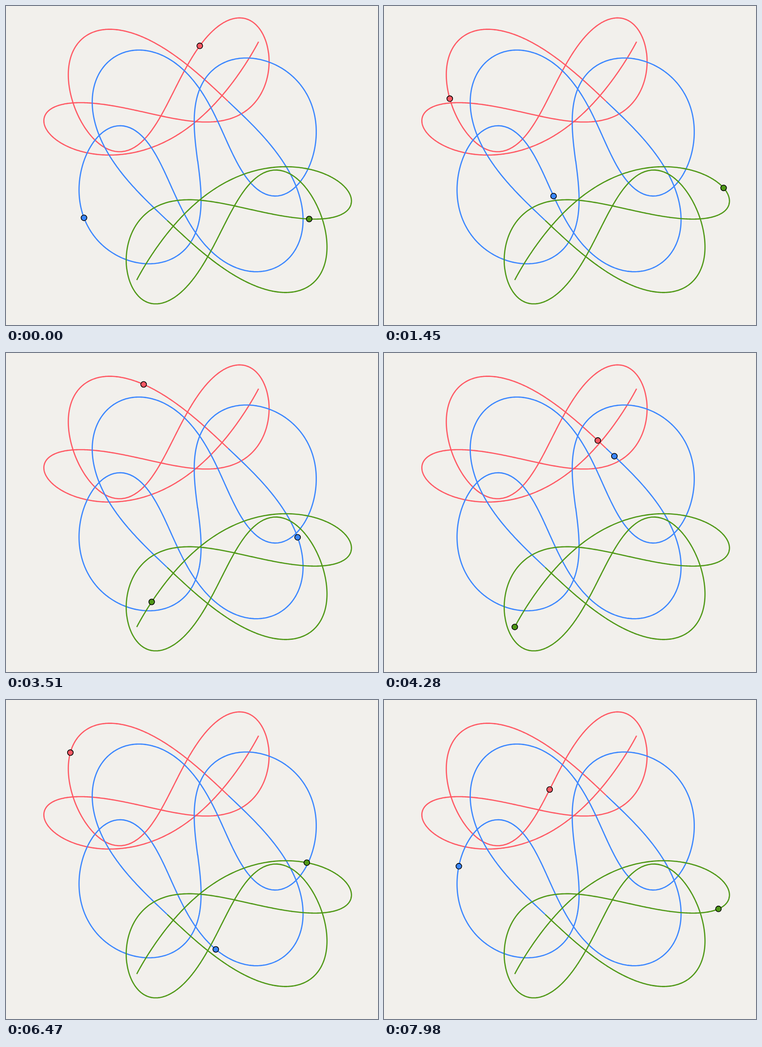
Recreate the animation shown at these times as an HTML page. Size 809x693 px, loop 8000 ms.

```html
<!DOCTYPE html>
<html lang="en">
<head>
<meta charset="utf-8">
<title>Three-body orbit</title>
<style>
  html, body { margin: 0; width: 100%; height: 100%; overflow: hidden; background: #f2f0ec; }
  svg { display: block; width: 809px; height: 693px; }
  path { fill: none; stroke-width: 2.6; stroke-linejoin: round; }
  circle { stroke: #000; stroke-width: 1.6; }
</style>
</head>
<body>
<svg id="stage" viewBox="0 0 809 693"></svg>
<script>
const LOOP = 8000;
const COLORS = ['#ff5964', '#3a86ff', '#4f9816'];
const PAIRS = [[0, 1], [0, 2], [1, 2]];

// Time in seconds, then x, y of the red, blue and green body.
const WAYPOINTS = [
  [0, 422.6, 84.3, 170.5, 462.5, 657, 462.5],
  [1.45, 142.7, 200.7, 369, 413.5, 738.7, 395],
  [2.75, 190, 57, 607.2, 555, 453.2, 397.8],
  [4.28, 463.8, 189, 502, 225.4, 284.5, 595],
  [5.19, 269.8, 57.5, 644, 439.8, 336.7, 512],
  [6.47, 139.8, 114.3, 456, 541.8, 654.7, 353.2],
  [7.98, 358.9, 196.7, 163, 359.2, 728.4, 453.7]
];

// Centre x, y; green's resting point x, y; collision angle; pair energy / 1e3;
// gravity / 1e6; time of the collision; time from there to the symmetric middle.
const GUESS = [416.8, 336.4, 284.5, 595, 0.757, 0, 21.3, 4.253, 5.9];
const COLLISION = 7, MIDDLE = 8;

function derivative(y, k) {
  const d = [...y.slice(6), 0, 0, 0, 0, 0, 0];
  for (const [i, j] of PAIRS) {
    const dx = y[2 * j] - y[2 * i], dy = y[2 * j + 1] - y[2 * i + 1];
    const q = k / Math.hypot(dx, dy) ** 3;
    d[6 + 2 * i] += q * dx; d[7 + 2 * i] += q * dy;
    d[6 + 2 * j] -= q * dx; d[7 + 2 * j] -= q * dy;
  }
  return d;
}

function stepRK4(y, k, dt) {
  const shifted = (d, h) => y.map((v, i) => v + d[i] * h);
  const a = derivative(y, k);
  const b = derivative(shifted(a, dt / 2), k);
  const c = derivative(shifted(b, dt / 2), k);
  const d = derivative(shifted(c, dt), k);
  return y.map((v, i) => v + dt / 6 * (a[i] + 2 * b[i] + 2 * c[i] + d[i]));
}

// Red and blue burst out of their collision while green starts from rest.
function integrate(p, end = 6.8) {
  const [cx, cy, gx, gy, angle] = p, energy = p[5] * 1e3, k = p[6] * 1e6;
  const mx = cx + (cx - gx) / 2, my = cy + (cy - gy) / 2;
  const r0 = 12, t0 = 2 / 3 * r0 ** 1.5 / Math.sqrt(4 * k);
  const ex = Math.cos(angle), ey = Math.sin(angle);
  const speed = Math.sqrt(2 * (energy + 2 * k / r0)) / 2;
  const pull = 2 * k / Math.hypot(mx - gx, my - gy) ** 3 * t0;
  const vx = pull * (mx - gx), vy = pull * (my - gy);
  let t = t0;
  let y = [mx - ex * r0 / 2, my - ey * r0 / 2, mx + ex * r0 / 2, my + ey * r0 / 2, gx, gy,
    -ex * speed - vx / 2, -ey * speed - vy / 2, ex * speed - vx / 2, ey * speed - vy / 2, vx, vy];
  const track = [{ t: 0, y: [mx, my, mx, my, gx, gy, 0, 0, 0, 0, 0, 0] }, { t, y }];
  while (t < end && track.length < 3000) {
    const near = Math.min(...PAIRS.map(([i, j]) =>
      Math.hypot(y[2 * j] - y[2 * i], y[2 * j + 1] - y[2 * i + 1])));
    const dt = 0.025 * Math.sqrt(near ** 3 / (2 * k));
    y = stepRK4(y, k, dt);
    t += dt;
    track.push({ t, y });
  }
  return track;
}

// Positions and velocities at time t, by Hermite interpolation.
function stateAt(track, t) {
  let lo = 0, hi = track.length - 1;
  while (hi - lo > 1) {
    const mid = (lo + hi) >> 1;
    if (track[mid].t > t) hi = mid; else lo = mid;
  }
  const a = track[lo], b = track[hi], h = b.t - a.t;
  const u = Math.min(1, (t - a.t) / h), w = 1 - u;
  return a.y.map((v, i) => lo === 0 || i > 5
    ? v * w + b.y[i] * u
    : w * w * (1 + 2 * u) * v + u * u * (3 - 2 * u) * b.y[i]
      + h * u * w * (w * a.y[i + 6] - u * b.y[i + 6]));
}

function waypointErrors(p, track = integrate(p)) {
  return WAYPOINTS.flatMap(([t, ...xy]) => {
    const y = stateAt(track, Math.abs(t - p[COLLISION]));
    return xy.map((v, i) => y[i] - v);
  });
}

// In the middle blue crosses the centre while red and green move in parallel.
function orbitErrors(p) {
  const track = integrate(p), y = stateAt(track, p[MIDDLE]);
  return [...waypointErrors(p, track),
    3 * (y[2] - p[0]), 3 * (y[3] - p[1]), y[6] - y[10], y[7] - y[11]];
}

function solve(A, b) {
  const n = b.length, M = A.map((row, i) => [...row, b[i]]);
  for (let c = 0; c < n; c++) {
    let best = c;
    for (let r = c + 1; r < n; r++) if (Math.abs(M[r][c]) > Math.abs(M[best][c])) best = r;
    [M[c], M[best]] = [M[best], M[c]];
    for (let r = 0; r < n; r++) {
      if (r === c) continue;
      const f = M[r][c] / M[c][c];
      for (let j = c; j <= n; j++) M[r][j] -= f * M[c][j];
    }
  }
  return M.map((row, i) => row[n] / row[i]);
}

const dot = (a, b) => a.reduce((sum, v, i) => sum + v * b[i], 0);

// Levenberg-Marquardt least squares.
function fit(p, errors, rounds = 30) {
  let damping = 0.01, e = errors(p), cost = dot(e, e);
  for (let n = 0; n < rounds; n++) {
    const J = p.map((v, i) => {
      const h = 1e-4 * Math.max(1, Math.abs(v)), q = [...p];
      q[i] += h;
      return errors(q).map((x, m) => (x - e[m]) / h);
    });
    const A = J.map(a => J.map(b => dot(a, b))), g = J.map(a => -dot(a, e));
    let improved = false;
    for (let tries = 0; tries < 8 && !improved; tries++) {
      const damped = A.map((row, i) => row.map((v, j) => i === j ? v + damping * v + 1e-6 : v));
      const delta = solve(damped, g), q = p.map((v, i) => v + delta[i]);
      const eq = errors(q), c = dot(eq, eq);
      if (c < cost) {
        improved = cost - c > 1e-7 * cost;
        p = q; e = eq; cost = c;
        damping /= 8;
        if (!improved) return p;
      } else damping *= 5;
    }
    if (!improved) break;
  }
  return p;
}

let orbit = fit(GUESS, waypointErrors);
const [cx, cy] = orbit;
const offCentre = s => Math.hypot(s.y[2] - cx, s.y[3] - cy);
orbit[MIDDLE] = integrate(orbit).filter(s => s.t > 5.2 && s.t < 6.7)
  .reduce((a, b) => offCentre(b) < offCentre(a) ? b : a).t;
orbit = fit(orbit, orbitErrors);
const track = integrate(orbit);

// The second half of each path is the mirrored first half of its partner.
function pathOf(body) {
  const partner = 2 - body, n = 500, first = [], second = [];
  for (let i = 0; i <= n; i++) {
    const y = stateAt(track, orbit[MIDDLE] * i / n);
    first.push([y[2 * body], y[2 * body + 1]]);
    second.unshift([2 * orbit[0] - y[2 * partner], 2 * orbit[1] - y[2 * partner + 1]]);
  }
  return 'M' + [...first, ...second].map(q => q.map(v => v.toFixed(2)).join(' ')).join('L');
}

const stage = document.getElementById('stage');
function add(tag, attributes) {
  const node = document.createElementNS(stage.namespaceURI, tag);
  for (const name in attributes) node.setAttribute(name, attributes[name]);
  return stage.appendChild(node);
}
COLORS.forEach((stroke, i) => add('path', { d: pathOf(i), stroke }));
const dots = COLORS.map(fill => add('circle', { r: 6.2, fill }));

function draw(now) {
  const y = stateAt(track, Math.abs(now % LOOP / 1000 - orbit[COLLISION]));
  dots.forEach((node, i) => {
    node.setAttribute('cx', y[2 * i]);
    node.setAttribute('cy', y[2 * i + 1]);
  });
  requestAnimationFrame(draw);
}
draw(0);
</script>
</body>
</html>
```
